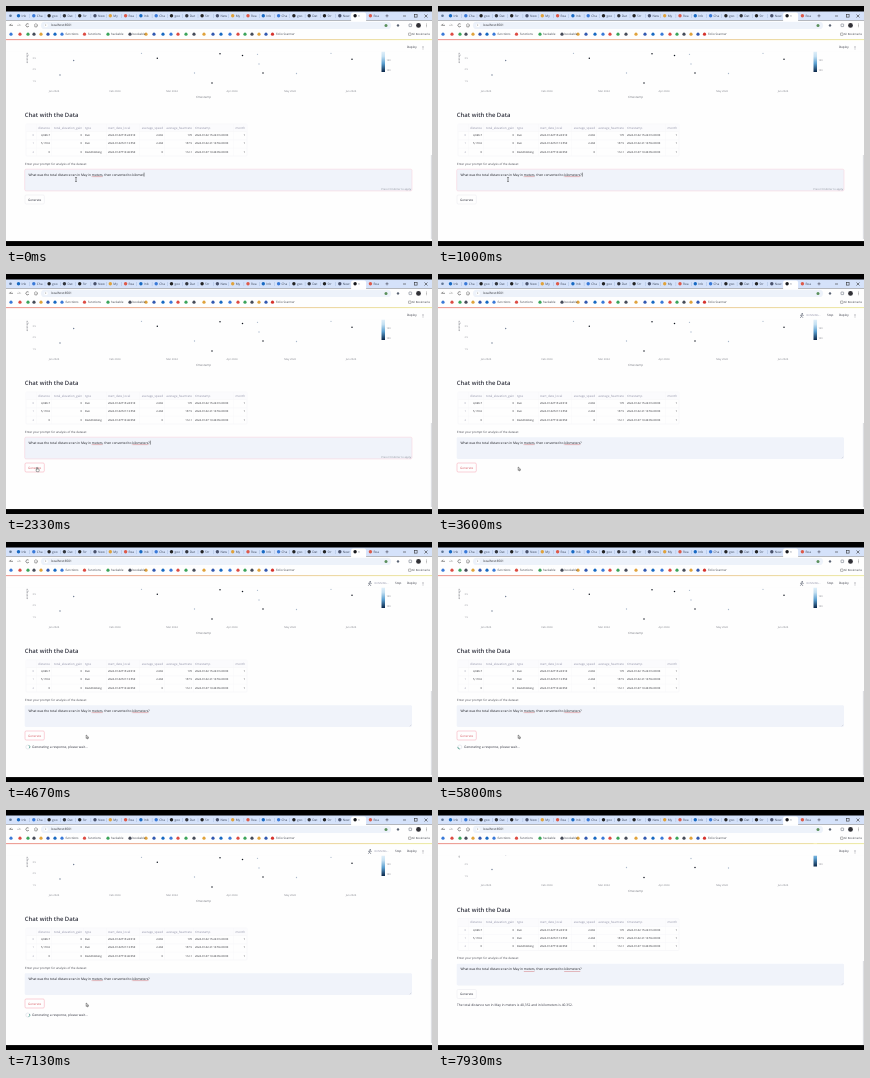
Animation, 426 px wide and 240 px high, one loop 8 s. Source, as an HTML page with a canvas:

```html
<!DOCTYPE html>
<html lang="en">
<head>
<meta charset="utf-8">
<title>Chat with the Data</title>
<style>
html, body { margin: 0; width: 100%; height: 100%; overflow: hidden; background: #000; }
canvas { display: block; width: 100vw; height: 100vh; }
</style>
</head>
<body>
<canvas id="stage"></canvas>
<script>
const W = 426, H = 240, LOOP = 8000;
const canvas = document.getElementById('stage');
const ctx = canvas.getContext('2d');
const INK = '#31333f', MUTED = '#9192a8', PAPER = '#fefefe';

const PROMPT = 'What was the total distance ran in May in meters, then converted to kilometers?';
const ANSWER = 'The total distance ran in May in meters is 40,352 and in kilometers is 40.352.';
const T = { typed: 800, leave: 1450, hover: 2150, click: 2750, away: 3350, wait: 4130, done: 7600 };
const SCROLL = 9.5;
const BODY = 3.27;

const clamp = v => Math.max(0, Math.min(1, v));
const ease = v => { v = clamp(v); return v * v * (3 - 2 * v); };

function rect(x, y, w, h, color) {
  ctx.fillStyle = color;
  ctx.fillRect(x, y, w, h);
}

function box(x, y, w, h, r, fill, stroke, width = 0.5) {
  ctx.beginPath();
  ctx.roundRect(x, y, w, h, r);
  if (fill) { ctx.fillStyle = fill; ctx.fill(); }
  if (stroke) { ctx.strokeStyle = stroke; ctx.lineWidth = width; ctx.stroke(); }
}

function dot(x, y, r, color) {
  ctx.fillStyle = color;
  ctx.beginPath();
  ctx.arc(x, y, r, 0, Math.PI * 2);
  ctx.fill();
}

function line(points, color, width = 0.6) {
  ctx.strokeStyle = color;
  ctx.lineWidth = width;
  ctx.beginPath();
  points.forEach(([x, y], i) => i ? ctx.lineTo(x, y) : ctx.moveTo(x, y));
  ctx.stroke();
}

function text(str, x, y, size, color = INK, align = 'left', weight = 400) {
  ctx.font = `${weight} ${size}px "Open Sans", "Noto Sans", sans-serif`;
  ctx.textAlign = align;
  ctx.fillStyle = color;
  ctx.fillText(str, x, y);
  return ctx.measureText(str).width;
}

function drawTabs() {
  rect(0, 5.5, W, 9, '#d5e2fa');
  const tones = ['#1769c2', '#48506a', '#222', '#dd5949', '#222', '#3979d8', '#e0a23b', '#31343c'];
  const names = ['Inb', 'Dat', 'My', 'Cha', 'Str', 'Rea', 'goo', 'New'];
  const active = 22;
  dot(4.5, 9.8, 1.3, '#607695');
  for (let i = 0; i < 24; i++) {
    const x = 12.5 + i * 15.3;
    if (i === active) box(x - 4, 6.5, 15, 9, [2, 2, 0, 0], '#fff');
    dot(x, 9.8, 1.7, i === active ? '#17181c' : tones[(i * 5) % 8]);
    text(i === active ? '×' : names[(i * 3) % 8], x + 3, 9.9, 3.2, '#3c475c');
    if (i < active - 1) rect(x + 11, 8, 0.4, 4, '#9eb4d7');
  }
  line([[379.5, 9.8], [382.5, 9.8]], '#445');
  line([[381, 8.3], [381, 11.3]], '#445');
  line([[397, 10], [400, 10]], '#333');
  ctx.strokeRect(408.5, 8.5, 2.6, 2.6);
  line([[418.5, 8.5], [421.5, 11.5]], '#333');
  line([[421.5, 8.5], [418.5, 11.5]], '#333');
}

function drawAddress() {
  rect(0, 14.5, W, 9.5, PAPER);
  line([[7, 19.3], [3.5, 19.3], [5, 17.8]], '#444');
  line([[11, 19.3], [14.5, 19.3], [13, 17.8]], '#aaa');
  ctx.beginPath();
  ctx.arc(21.5, 19.3, 1.6, 0.5, 5.5);
  ctx.strokeStyle = '#444';
  ctx.stroke();
  line([[28, 19.2], [29.9, 17.6], [31.8, 19.2], [31, 19.2], [31, 20.9], [28.8, 20.9], [28.8, 19.2]], '#555', 0.5);
  box(35, 15.7, 350, 7.4, 3.7, '#edf2fa');
  dot(40, 19.4, 1.8, '#fff');
  text('i', 40, 19.5, 2.8, '#444', 'center', 600);
  text('localhost:8501', 45, 19.5, 3.1, '#25272c');
  dot(380, 19.4, 1.5, '#5a8f5c');
  dot(392, 19.4, 1.2, '#596272');
  box(403, 18, 2.6, 2.6, 0.4, null, '#596272');
  dot(412.5, 19.4, 2.4, '#303036');
  for (let i = -1; i < 2; i++) dot(420.5, 19.4 + i * 1.4, 0.4, '#444');
}

function drawBookmarks() {
  rect(0, 24, W, 9.5, PAPER);
  const xs = [5, 14, 22, 28, 35, 42, 49, 56, 78.5, 102, 124, 140, 148, 157, 165, 172, 180, 188, 198, 207, 215, 224, 232, 239, 246, 253, 260];
  const tones = ['#3979d8', '#3ba45a', '#e0a23b', '#1769c2', '#dd4b43', '#464b58', '#3158b0'];
  xs.forEach((x, i) => dot(x, 28.2, 1.6, tones[(i * 4) % 7]));
  [['functions', 59.5], ['functions', 82], ['hackable', 105], ['bookable', 126.5], ['Folio Scanner', 270]]
    .forEach(([s, x]) => text(s, x, 28.4, 3, '#3b3f48'));
  dot(266.5, 28.2, 1.6, '#d6322c');
  box(402.5, 27, 2.6, 2.4, 0.3, null, '#555', 0.4);
  text('All Bookmarks', 405.8, 28.4, 2.75, '#41444c');
}

function drawChart() {
  ctx.save();
  ctx.translate(21.5, 52);
  ctx.rotate(-Math.PI / 2);
  text('average', 0, 0, 2.9, '#75777f', 'center');
  ctx.restore();
  ['3.5', '2.5', '1.5'].forEach((s, i) => text(s, 30, 52 + i * 11.7, 2.5, '#8b8d94', 'right'));
  [48, 109, 166, 226, 284, 345].forEach((x, i) =>
    text(['Jan', 'Feb', 'Mar', 'Apr', 'May', 'Jun'][i] + ' 2024', x, 85.3, 2.6, '#7d7f87', 'center'));
  text('timestamp', 197.5, 91.2, 3, '#75777f', 'center');

  const soft = [[67.7, 54.5], [54, 69], [135.5, 47.3], [188.5, 67], [251.5, 48.3], [290.5, 67.5], [325, 47.3], [253, 58]];
  const strong = [[151.3, 52.3], [206, 77], [214, 47.7], [236.5, 49.5], [257, 67], [346, 53.3]];
  soft.forEach(([x, y], i) => dot(x, y, 0.65, i < 2 ? '#63718a' : '#a9b8ca'));
  strong.forEach(([x, y]) => dot(x, y, 0.75, '#10151f'));

  const shade = ctx.createLinearGradient(0, 42, 0, 66);
  shade.addColorStop(0, '#f4faff');
  shade.addColorStop(0.35, '#c4e0f2');
  shade.addColorStop(0.65, '#5a9fd0');
  shade.addColorStop(1, '#0a2648');
  rect(375.5, 38, 3.5, 28, shade);
  text('150', 380.5, 54, 2.4, '#75777f');
  text('100', 380.5, 64, 2.4, '#75777f');
}

function drawTable() {
  const cols = [
    ['', 28, 'right'], ['distance', 44, 'right'], ['total_elevation_gain', 76, 'right'], ['type', 79, 'left'],
    ['start_date_local', 102, 'left'], ['average_speed', 157, 'right'], ['average_heartrate', 186, 'right'],
    ['timestamp', 189, 'left'], ['month', 239, 'right']
  ];
  const rows = [
    ['0', '4,696.7', '0', 'Run', '2024-01-02T15:24:01Z', '2.602', '170', '2024-01-02 15:24:01+00:00', '1'],
    ['1', '5,110.6', '0', 'Run', '2024-01-02T21:13:55Z', '2.204', '157.5', '2024-01-02 21:13:55+00:00', '1'],
    ['2', '0', '0', 'RockClimbing', '2024-01-07T13:46:05Z', '0', '112.1', '2024-01-07 13:46:05+00:00', '1']
  ];
  box(20, 118, 221, 32, 1, PAPER, '#f0f0f4', 0.4);
  rect(20.2, 118.2, 220.6, 7.5, '#fbfbfd');
  for (let i = 0; i < 3; i++) rect(20, 125.7 + i * 8.1, 221, 0.35, '#f1f1f5');
  [30, 45, 77.5, 100.5, 133.5, 158.5, 187.5, 227].forEach(x => rect(x, 118, 0.3, 32, '#f4f4f7'));
  cols.forEach(([name, x, align], c) => {
    text(name, x, 122, 3.05, MUTED, align);
    rows.forEach((row, r) => text(row[c], x, 129.6 + r * 8.15, 2.65, c ? '#1d1e25' : MUTED, align));
  });
}

function wavy(x, w, y) {
  const pts = [];
  for (let i = 0; i <= w; i += 0.5) pts.push([x + i, y + (i % 1 ? 0.25 : -0.25)]);
  line(pts, '#c8474a', 0.4);
}

function drawPrompt(t) {
  const focus = t < T.click;
  text('Enter your prompt for analysis of the dataset', 19, 158, 2.94, '#44464f');
  box(18.7, 163.2, 387.3, 21.7, 1.3, '#f0f3fa', focus ? '#f8ccd8' : null, 0.5);
  const start = PROMPT.indexOf('kilometers');
  const count = Math.min(PROMPT.length, start + 7 + Math.floor(clamp(t / T.typed) * 4.01));
  const w = text(PROMPT.slice(0, count), 22.5, 168.7, BODY, '#191a20');
  const underline = (word, min) => {
    if (count < min) return;
    const at = PROMPT.indexOf(word);
    wavy(22.5 + ctx.measureText(PROMPT.slice(0, at)).width, ctx.measureText(word).width, 170.8);
  };
  underline('meters', 0);
  underline('kilometers', PROMPT.length);
  if (focus && (t < T.typed || (t - T.typed) % 1060 < 530)) rect(22.7 + w, 166.6, 0.45, 4, '#111');
  if (focus) text('Press Ctrl+Enter to apply', 405, 183.2, 2.6, '#8f919b', 'right');
  line([[403.8, 184.3], [405.3, 182.8]], '#a7a9b2', 0.35);

  const hot = t >= T.hover - 100 && t < T.done;
  box(19, 189, 19.3, 9, 1.2, PAPER, hot ? '#f6a3b0' : '#e9e9ef', 0.5);
  text('Generate', 28.6, 193.7, 3.1, hot ? '#d9626a' : INK, 'center');
}

function drawSpinner(t) {
  const a = t / 1000 * Math.PI * 2.5;
  ctx.lineWidth = 0.7;
  ctx.strokeStyle = '#dfe2ea';
  ctx.beginPath();
  ctx.arc(21.8, 205, 2, 0, Math.PI * 2);
  ctx.stroke();
  ctx.strokeStyle = '#35937c';
  ctx.beginPath();
  ctx.arc(21.8, 205, 2, a, a + 1.6);
  ctx.stroke();
  text('Generating a response, please wait...', 26, 205, BODY);
}

function drawHeader(t) {
  rect(0, 33.5, W, 12.2, PAPER);
  const glow = ctx.createLinearGradient(0, 0, W, 0);
  glow.addColorStop(0, '#ff6a5d');
  glow.addColorStop(1, '#fffb80');
  rect(0, 33.3, W, 0.8, glow);
  text('Deploy', 401, 41.6, 3, INK);
  for (let i = -1; i < 2; i++) dot(417, 41.6 + i * 1.3, 0.4, INK);
  if (t < T.click + 500 || t >= T.done) return;
  const swing = Math.floor(t / 200) % 2 ? 1 : -1;
  dot(364.2, 39.6, 0.7, '#596070');
  line([[364, 40.4], [363.6, 42.2], [363.6 + swing * 1.4, 44]], '#596070');
  line([[363.6, 42.2], [363.6 - swing * 1.4, 43.8]], '#596070');
  line([[362, 41.5], [364, 40.8], [365.8, 41.5]], '#596070');
  text('RUNNING...', 368.5, 41.7, 2.6, MUTED);
  text('Stop', 389, 41.6, 3, INK);
}

function drawPointer(t) {
  if (t >= T.done) return;
  const a = ease((t - T.leave) / (T.hover - T.leave));
  const b = ease((t - T.click - 100) / (T.away - T.click - 100));
  const x = 70 - 39 * a + 50 * b;
  const y = 173.5 + 20.5 * a;
  if (y < 183) {
    line([[x - 0.8, y - 2], [x + 0.8, y - 2]], '#222', 0.5);
    line([[x, y - 2], [x, y + 2]], '#222', 0.5);
    line([[x - 0.8, y + 2], [x + 0.8, y + 2]], '#222', 0.5);
  } else if (x < 39) {
    box(x - 0.5, y - 0.7, 1.1, 3, 0.5, '#fff', '#222', 0.4);
    box(x - 0.8, y + 1, 3, 2.7, 0.8, '#fff', '#222', 0.4);
  } else {
    ctx.beginPath();
    [[0, 0], [0, 3.4], [0.8, 2.7], [1.4, 4], [2, 3.7], [1.4, 2.4], [2.5, 2.4]]
      .forEach(([dx, dy]) => ctx.lineTo(x - 0.8 + dx, y - 1 + dy));
    ctx.closePath();
    ctx.fillStyle = '#fff';
    ctx.fill();
    ctx.strokeStyle = '#222';
    ctx.lineWidth = 0.45;
    ctx.stroke();
  }
}

function drawPage(t) {
  const done = t >= T.done;
  ctx.save();
  ctx.beginPath();
  ctx.rect(0, 33.3, W, 202);
  ctx.clip();
  rect(0, 33.3, W, 202, PAPER);
  ctx.save();
  if (done) ctx.translate(0, -SCROLL);
  drawChart();
  text('Chat with the Data', 18.8, 109.8, 5.95, INK, 'left', 600);
  drawTable();
  drawPrompt(t);
  if (done) text(ANSWER, 19, 204.7, BODY);
  else if (t >= T.wait) drawSpinner(t);
  ctx.restore();
  drawHeader(t);
  rect(424.9, done ? 151 : 149, 0.8, 84, '#d0d2d8');
  drawPointer(t);
  ctx.restore();
}

function resize() {
  const ratio = window.devicePixelRatio || 1;
  canvas.width = Math.round(innerWidth * ratio);
  canvas.height = Math.round(innerHeight * ratio);
}

function frame(now) {
  ctx.setTransform(canvas.width / W, 0, 0, canvas.height / H, 0, 0);
  ctx.textBaseline = 'middle';
  ctx.textRendering = 'geometricPrecision';
  rect(0, 0, W, H, '#000');
  drawTabs();
  drawAddress();
  drawBookmarks();
  drawPage(now % LOOP);
  requestAnimationFrame(frame);
}

addEventListener('resize', resize);
resize();
requestAnimationFrame(frame);
</script>
</body>
</html>
```
